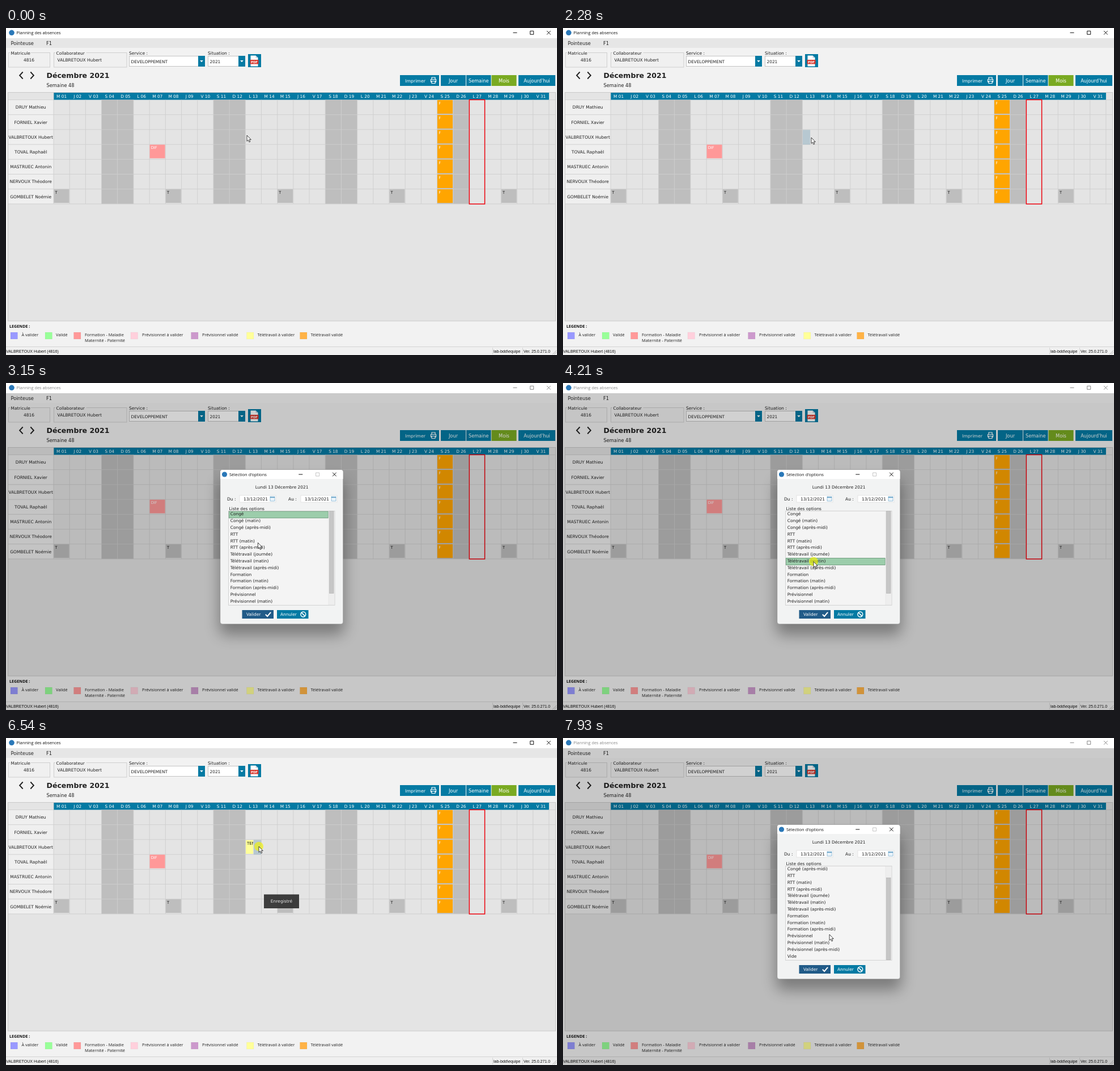
An HTML page that plays this animation: 972 by 576 pixels, repeating every 8 s.

```html
<!DOCTYPE html>
<html lang="fr">
<head>
<meta charset="utf-8">
<title>Planning des absences</title>
<style>
html, body { margin: 0; width: 100%; height: 100%; overflow: hidden; background: #f2f2f2; }
svg { display: block; width: 972px; height: 576px; }
text { font-family: "DejaVu Sans", Verdana, sans-serif; white-space: pre; }
.ui { font-family: "Open Sans", "Noto Sans", sans-serif; }
.sys { font-family: "Liberation Sans", Arial, sans-serif; }
</style>
</head>
<body>
<svg id="stage" viewBox="0 0 972 576" xmlns="http://www.w3.org/2000/svg"></svg>
<script>
const LOOP = 8000;
const BLUE = '#047aa3', LINE = '#cfcfcf', OFF = '#bebebe', INK = '#222';
const GRID = { x: 84, y: 126.5, w: 28.19, h: 26.2, days: 31 };
const PEOPLE = ['DRUY Mathieu', 'FORNIEL Xavier', 'VALBRETOUX Hubert', 'TOVAL Raphaël',
  'MASTRUEC Antonin', 'NERVOUX Théodore', 'GOMBELET Noémie'];
const OPTIONS = ['Congé', 'Congé (matin)', 'Congé (après-midi)', 'RTT', 'RTT (matin)', 'RTT (après-midi)',
  'Télétravail (journée)', 'Télétravail (matin)', 'Télétravail (après-midi)', 'Formation',
  'Formation (matin)', 'Formation (après-midi)', 'Prévisionnel', 'Prévisionnel (matin)',
  'Prévisionnel (après-midi)', 'Vide'];
const ROW = 11.8;

const rect = (x, y, w, h, fill, extra = '') =>
  `<rect x="${x}" y="${y}" width="${w}" height="${h}" fill="${fill}" ${extra}/>`;
const text = (x, y, s, size = 7.5, fill = INK, extra = '') =>
  `<text x="${x}" y="${y}" font-size="${size}" fill="${fill}" ${extra}>${s}</text>`;
const path = (d, stroke, width = 1, fill = 'none', extra = '') =>
  `<path d="${d}" stroke="${stroke}" stroke-width="${width}" fill="${fill}" ${extra}/>`;
const stroke = (color, width = 1) => `stroke="${color}" stroke-width="${width}"`;
const MID = 'text-anchor="middle"';
const colX = day => GRID.x + (day - 1) * GRID.w;
const rowY = i => GRID.y + i * GRID.h;

function windowControls(x, y, step, color, maxColor = color) {
  const m = x + step, c = x + 2 * step;
  return path(`M${x - 3.5} ${y}h7`, color)
    + path(`M${m - 3} ${y - 3}h6v6h-6z`, maxColor)
    + path(`M${c - 3.3} ${y - 3.3}l6.6 6.6m0 -6.6l-6.6 6.6`, color);
}

function titleBar() {
  return rect(0, 0, 972, 18, '#fff')
    + '<circle cx="10" cy="8.3" r="4.8" fill="#2a78b8"/>'
    + `<g id="caption">${text(18.5, 11, 'Planning des absences', 7.4, '#111', 'class="ui"')}`
    + windowControls(898, 8.3, 29.7, '#111') + '</g>'
    + rect(0, 18, 972, 17, '#e6e6e6')
    + text(8.5, 29.5, 'Pointeuse', 8.3) + text(71, 29.5, 'F1', 8.3);
}

function groupBox(x, w, label, labelW) {
  return rect(x, 43.5, w, 25.5, '#f0f0f0', stroke(LINE))
    + rect(x + 3, 42, labelW, 3, '#f2f2f2') + text(x + 4, 47, label, 7.4);
}

function combo(x, w, label, value) {
  const b = x + w;
  return text(x, 47, label, 7.6) + rect(x + .5, 49.5, w, 18, '#fff', stroke('#c4c4c4'))
    + text(x + 3.5, 62, value, 7.4) + rect(b, 49, 12, 19, BLUE)
    + path(`M${b + 3.2} 57h5.6l-2.8 3.2z`, 'none', 0, '#fff');
}

function button(x, w, label, size, fill = BLUE, tx = x + w / 2) {
  return rect(x, 83, w, 19, fill) + text(tx, 95.6, label, size, '#fff', MID);
}

function toolbar() {
  return groupBox(4.5, 73, 'Matricule', 36) + text(40.5, 59.3, '4816', 7.5, INK, MID)
    + groupBox(84.5, 128.5, 'Collaborateur', 54) + text(90.5, 59.3, PEOPLE[2])
    + combo(217, 122, 'Service :', 'DEVELOPPEMENT') + combo(356, 54, 'Situation :', '2021')
    + rect(427, 46, 23, 23, BLUE)
    + path('M431.5 48.5h9l4 4v15h-13z', 'none', 0, '#fff') + path('M440.5 48.5v4h4z', 'none', 0, '#bcd')
    + rect(430.5, 56, 15, 7.5, '#d9372c')
    + text(438, 62, 'PDF', 5.4, '#fff', MID + ' font-weight="bold"')
    + path('M29.7 77.5l-5.6 6 5.6 6M43.3 77.5l5.6 6 -5.6 6', '#222', 1.9)
    + text(71.5, 88, 'Décembre 2021', 12.55, '#222', 'font-weight="bold"')
    + text(71.5, 104.3, 'Semaine 48', 8.25)
    + button(695, 69, 'Imprimer', 7.8, BLUE, 722)
    + path('M751 90v-3h6v3M751 95h-1.5v-4.5h9v4.5h-1.5M751 93.5h6v4h-6z', '#fff', 1.2)
    + button(767, 44, 'Jour', 8.3) + button(812, 43.5, 'Semaine', 8.15)
    + button(856.5, 44, 'Mois', 8.3, '#7aaa22') + button(904, 65, "Aujourd'hui", 8.2);
}

function planning() {
  const right = colX(GRID.days + 1), bottom = rowY(PEOPLE.length);
  const tall = bottom - GRID.y;
  let s = rect(3.5, 113.5, 966, 402.5, '#e4e4e4', stroke('#c9c9c9'))
    + rect(4, 114, 80, bottom - 114, '#efefef') + rect(4, 114, 80, 12.5, '#e4e4e4')
    + rect(GRID.x, 114, right - GRID.x, 12.5, BLUE);
  let lines = '';
  for (let day = 1; day <= GRID.days; day++) {
    const x = colX(day), letter = 'MJVSDLM'[(day - 1) % 7];
    if ('SD'.includes(letter)) s += rect(x, GRID.y, GRID.w, tall, OFF);
    s += text(x + GRID.w / 2, 122.9, `${letter} ${String(day).padStart(2, '0')}`, 7.35, '#fff', MID);
    lines += `M${x} ${GRID.y}v${tall}`;
  }
  lines += `M${right} ${GRID.y}v${tall}M84 114v12`;
  PEOPLE.forEach((name, i) => {
    lines += `M4 ${rowY(i + 1)}H969`;
    s += text(43.7, rowY(i) + 15.9, name, 7.5, INK, MID);
  });
  s += path(lines + 'M4 126.5H84M958 126.5H969', LINE, .9);
  const event = (day, row, label, fill, ink) =>
    rect(colX(day) + .4, rowY(row) + .4, 27, 24, fill)
    + text(colX(day) + 2.6, rowY(row) + 8.3, label, 6.6, ink);
  PEOPLE.forEach((_, i) => s += event(25, i, 'F', '#ffa500', '#fff'));
  for (let day = 1; day <= 29; day += 7) s += event(day, 6, 'T', OFF, '#111');
  s += event(7, 3, 'DIF', '#ff9898', '#fff');
  s += `<g id="saved">${rect(423, 179.8, 13, 24.2, '#ffff99')}`
    + `<g clip-path="url(#half)">${text(425, 187.6, 'TEM', 7, '#111')}</g></g>`;
  s += rect(0, 179.5, 13.2, 25.8, '#7fa4b8', 'id="pick" fill-opacity=".45"');
  return s + rect(colX(27) + .4, 126.4, 27.2, 183.6, 'none', stroke('#f00510', 1.5));
}

function legend() {
  const items = [[8, 27.5, '#9999ff', 'À valider'], [69, 88, '#99ff99', 'Validé'],
    [119.5, 139, '#ff9999', 'Formation - Maladie'], [220, 240, '#ffd0dc', 'Prévisionnel à valider'],
    [326.5, 346, '#cc99cc', 'Prévisionnel validé'], [424.5, 443.5, '#ffff99', 'Télétravail à valider'],
    [518.5, 537.5, '#ffb347', 'Télétravail validé']];
  return text(6, 528, 'LEGENDE :', 7.2, '#111', 'class="ui" font-weight="bold"')
    + items.map(([x, tx, fill, label]) =>
      rect(x, 536, 12.5, 12, fill, stroke('#0001', .5)) + text(tx, 543.3, label, 7.35, INK, 'class="ui"')).join('')
    + text(139, 553, 'Maternité - Paternité', 7.35, INK, 'class="ui"');
}

function statusBar() {
  return rect(0, 561, 972, 15, '#f0f0f0') + path('M0 561.5H972M858.5 563v12M911.5 563v12', '#d4d4d4')
    + text(0, 572, PEOPLE[2] + ' (4816)', 7.1, '#111', 'class="sys"')
    + text(860, 572, 'lab-bdd\\equipe', 7.2, '#111', 'class="sys"')
    + text(913, 572, 'Ver. 25.0.271.0', 7, '#111', 'class="sys"')
    + path('M964 575l7 -7M967 575l4 -4', '#b8b8b8');
}

function dateField(x, label) {
  const f = x + 22;
  return text(x, 206.6, label) + rect(f, 198, 64, 12, '#fff', stroke('#d8d8d8', .6))
    + text(f + 7, 206.7, '13/12/2021', 7.45)
    + rect(f + 54, 200, 8, 8, '#eaf4fb', stroke('#4f93bd', .8) + ' stroke-dasharray="1.6 .8"')
    + path(`M${f + 54} 201.5h8`, '#4f93bd', 1.2);
}

function dialog() {
  return '<rect x="376" y="172" width="221" height="272" rx="12" fill="#000" opacity=".34" filter="url(#soft)"/>'
    + rect(378, 153, 216.5, 271.5, '#f2f3f3', 'rx="4" ' + stroke('#8888', .6))
    + path('M378 169V157a4 4 0 0 1 4 -4H590.5a4 4 0 0 1 4 4V169z', 'none', 0, '#fff')
    + '<circle cx="385.5" cy="161" r="4.6" fill="#2a78b8"/>'
    + text(394, 163.7, "Sélection d'options", 7.5, '#111', 'class="ui"')
    + windowControls(519.8, 161, 29.8, '#111', '#c4c4c4')
    + text(486.6, 186, 'Lundi 13 Décembre 2021', 7.4, INK, MID)
    + dateField(390, 'Du :') + dateField(498, 'Au :')
    + text(393.5, 224, 'Liste des options', 7.4)
    + rect(392.5, 225.5, 187.5, 166, '#f4f4f4', stroke('#cdcdcd', .8))
    + `<g clip-path="url(#list)"><g id="rows">${rect(393.3, 226, 175, ROW, '#9ccdab', 'id="choice" ' + stroke('#5f8f6e', .8))}`
    + OPTIONS.map((o, i) => text(395.7, 233.3 + i * ROW, o, 7.45)).join('') + '</g></g>'
    + rect(569, 226, 10.6, 165, '#eee', stroke('#ddd', .5))
    + rect(570.6, 225.8, 7.4, 144.5, '#c6c6c6', 'id="thumb" ' + stroke('#adadad', .6))
    + rect(416.5, 400, 55.5, 15, '#215b88') + text(424, 410.3, 'Valider', 7.4, '#fff')
    + path('M457.8 407.6l3.3 3.4 6 -7.2', '#fff', 2)
    + rect(478, 400, 55.5, 15, BLUE) + text(484, 410.3, 'Annuler', 7.4, '#fff')
    + '<circle cx="524.3" cy="407.5" r="4.4" fill="none" stroke="#fff" stroke-width="1.5"/>'
    + path('M521.2 404.4l6.2 6.2', '#fff', 1.5);
}

const stage = document.getElementById('stage');
stage.innerHTML = `<defs>
  <filter id="soft" x="-30%" y="-30%" width="160%" height="160%"><feGaussianBlur stdDeviation="13"/></filter>
  <clipPath id="half">${rect(423, 179, 13, 26, '#000')}</clipPath>
  <clipPath id="list">${rect(392.5, 225.5, 176.5, 166, '#000')}</clipPath></defs>`
  + rect(0, 0, 972, 576, '#f2f2f2') + titleBar() + toolbar() + planning() + legend() + statusBar()
  + `<g id="dim">${rect(0, 18, 972, 17, '#000', 'id="menuDim"')}${rect(0, 35, 972, 541, '#000', 'opacity=".18"')}</g>`
  + `<g id="toast">${rect(455, 275.5, 62, 24.5, '#343434', 'opacity=".95"')}${text(486, 290.3, 'Enregistré', 7.5, '#e8e8e8', MID)}</g>`
  + `<g id="dialog">${dialog()}</g>`
  + '<circle id="halo" r="8" fill="#f2f200" opacity=".65"/>'
  + `<g id="arrow">${path('M0 0V10.4L2.4 8.2 4 12 5.8 11.2 4.2 7.6H7.3z', '#111', .8, '#fff')}</g>`
  + `<g id="beam">${path('M-2.5 -5.5q2 0 2.5 1q.5 -1 2.5 -1M0 -4.5v9M-2.5 5.5q2 0 2.5 -1q.5 1 2.5 1', '#111', .9)}</g>`;

const el = {};
stage.querySelectorAll('[id]').forEach(n => el[n.id] = n);
const show = (node, on) => node.setAttribute('visibility', on ? 'visible' : 'hidden');
const place = (node, x, y) => node.setAttribute('transform', `translate(${x} ${y})`);
const clamp = v => Math.min(1, Math.max(0, v));
const within = (t, spans) => spans.some(([a, b]) => t >= a && t < b);

// time, x, y of the pointer's tip
const ROUTE = [[0, 425, 189], [2200, 425, 189], [2280, 438, 193], [2360, 438, 193], [2450, 442, 201],
  [2980, 443, 273], [3400, 447, 296], [3770, 442, 313], [3850, 442, 314.5], [4520, 442, 314.5],
  [4780, 435, 409], [5250, 435, 409], [5820, 443, 211], [6060, 446, 191], [7050, 446, 191],
  [7130, 452, 198], [7170, 452, 198], [7850, 470, 345], [7930, 470, 346], [LOOP, 470, 346]];
const CLICKS = [[1030, 1400], [1570, 1900], [4210, 4520], [4780, 5060], [6230, 6560], [6700, 7000]];
const DIALOGS = [[2400, 5150], [7170, LOOP]];

function pointer(t) {
  const i = ROUTE.findIndex(p => p[0] > t);
  const [t0, x0, y0] = ROUTE[i - 1], [t1, x1, y1] = ROUTE[i];
  const k = (t - t0) / (t1 - t0), e = t1 - t0 > 200 ? k * k * (3 - 2 * k) : k;
  return [x0 + (x1 - x0) * e, y0 + (y1 - y0) * e];
}

function render(t) {
  const open = within(t, DIALOGS), second = t >= 7170;
  const [x, y] = pointer(t);

  show(el.pick, t >= 1070);
  el.pick.setAttribute('x', t < 6230 ? 422.9 : 436.8);
  show(el.saved, t >= 5300);
  show(el.toast, t >= 5400 && t < 7300);
  show(el.dim, within(t, [[2360, 5130], [7130, LOOP]]));
  el.menuDim.setAttribute('opacity', open ? .12 : .22);
  el.caption.setAttribute('opacity', within(t, [[2400, 5230], [7170, LOOP]]) ? .5 : 1);

  show(el.dialog, open);
  const grow = 1 - (1 - clamp((t - (second ? 7170 : 2400)) / 200)) ** 3;
  const leave = second ? 0 : clamp((t - 5060) / 90);
  const scale = .925 + .075 * grow - .06 * leave;
  el.dialog.setAttribute('transform', `translate(443 258) scale(${scale}) translate(-443 -258)`);
  el.dialog.setAttribute('opacity', 1 - leave);
  const scroll = t >= 7720 ? 2 : 0;
  place(el.rows, 0, -scroll * ROW);
  place(el.choice, 0, t >= 4210 && !second ? 7 * ROW : 0);
  place(el.thumb, 0, scroll * 10.2);

  const editing = open && y > 196 && y < 211 && x < 476;
  show(el.arrow, !editing);
  show(el.beam, editing);
  [el.arrow, el.beam, el.halo].forEach(n => place(n, x, y));
  show(el.halo, within(t, CLICKS));
}

const start = performance.now();
function tick() {
  render((performance.now() - start) % LOOP);
  requestAnimationFrame(tick);
}
tick();
</script>
</body>
</html>
```
